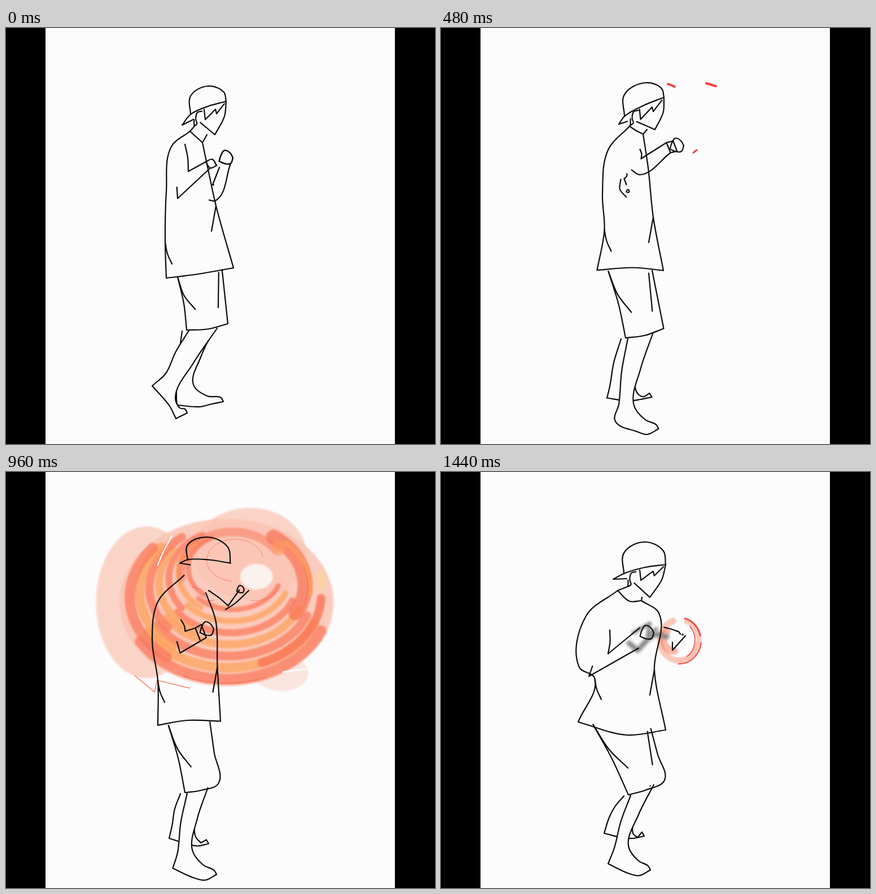
An HTML page with a canvas that plays this animation: 760 by 737 pixels, repeating every 1.52 s.

```html
<!DOCTYPE html>
<html lang="en">
<head>
<meta charset="utf-8">
<title>Fire punch</title>
<style>
html, body { margin: 0; width: 100%; height: 100%; overflow: hidden; background: #000; }
canvas { display: block; }
</style>
</head>
<body>
<canvas id="stage" width="760" height="737"></canvas>
<script>
const ctx = document.getElementById('stage').getContext('2d');
const PAPER = '#fcfcfc', INK = '#0b0b0b', PALE = '#fbc3b3', CORAL = '#f97558',
      ORANGE = '#fda057', YELLOW = '#fddb7c', RED = '#f5423b', GREY = '#888';

// hat: back, top, front, visor. head: chin, nape, throat.
// arms: shoulder, crook, elbow, both wrist sides, fist. feet: shin, heel, toe, instep.
const guard = {
  hat: [327, 153, 357, 103, 390, 130, 312, 172], head: [370, 189, 326, 183, 348, 203],
  back: [293, 210, 284, 290, 282, 380, 284, 443], front: [360, 260, 372, 315, 403, 425], hem: [340, 436],
  near: [317, 206, 323, 254, 304, 302, 354, 237, 362, 248, 390, 230],
  far: [366, 278, 366, 278, 371, 306, 378, 247, 398, 240, 390, 230],
  knees: [320, 535, 393, 524],
  foot: [283, 612, 259, 634, 321, 682, 300, 655], farFoot: [302, 658, 303, 668, 385, 662, 332, 632], inner: true
};
const punch = {
  hat: [324, 150, 365, 92, 396, 118, 317, 162], head: [378, 166, 343, 161, 365, 164],
  back: [300, 202, 291, 290, 294, 340, 281, 411], front: [372, 240, 372, 330, 394, 408], hem: [345, 402],
  near: [365, 195, 362, 163, 380, 187, 425, 142, 430, 160, 448, 156],
  far: [374, 254, 374, 254, 374, 280, 376, 255, 376, 281, 381, 269],
  knees: [319, 530, 388, 522],
  foot: [323, 662, 318, 692, 388, 706, 347, 655], farFoot: [306, 640, 304, 656, 380, 654, 346, 640]
};
const recoil = {
  hat: [326, 163, 360, 102, 394, 128, 313, 179], head: [380, 194, 325, 187, 351, 212],
  back: [292, 230, 281, 300, 285, 375, 272, 447], front: [362, 255, 380, 340, 394, 451], hem: [335, 447],
  near: [340, 235, 347, 300, 325, 333, 374, 264, 383, 282, 388, 261],
  far: [285, 262, 275, 280, 260, 292, 281, 300, 281, 318, 281, 309],
  knees: [335, 568, 401, 543],
  foot: [307, 672, 299, 700, 383, 714, 336, 680], farFoot: [292, 630, 284, 655, 367, 654, 345, 645], inner: true
};
const raise = {
  hat: [303, 171, 345, 121, 378, 165, 303, 172], head: [352, 213, 303, 203, 358, 213],
  back: [248, 240, 238, 325, 262, 370, 261, 467], front: [386, 262, 379, 340, 375, 460], hem: [320, 457],
  near: [385, 225, 420, 300, 433, 326, 434, 220, 448, 225, 429, 206],
  far: [262, 260, 277, 300, 257, 344, 311, 288, 327, 302, 342, 277],
  knees: [298, 568, 357, 556],
  foot: [301, 678, 294, 706, 371, 714, 330, 677], farFoot: [294, 630, 288, 654, 360, 662, 331, 643], inner: true
};
const swing = {
  hat: [340, 140, 372, 110, 417, 158, 313, 151], head: [370, 202, 328, 163, 350, 215],
  back: [290, 220, 280, 270, 276, 370, 277, 430], front: [357, 265, 370, 350, 385, 423], hem: [320, 423],
  near: [333, 195, 367, 174, 378, 140, 393, 198, 412, 195, 402, 210],
  far: [358, 264, 358, 264, 360, 297, 360, 265, 362, 297, 370, 280],
  knees: [336, 568, 396, 547],
  foot: [307, 670, 297, 698, 375, 712, 330, 662], farFoot: [295, 620, 290, 644, 358, 655, 340, 648], hidden: true
};
const follow = {
  hat: [342, 172, 375, 127, 414, 174, 318, 185], head: [388, 219, 345, 200, 375, 205],
  back: [295, 245, 275, 330, 271, 390, 277, 450], front: [380, 307, 375, 350, 388, 469], hem: [322, 434],
  near: [339, 222, 384, 248, 380, 305, 413, 255, 430, 278, 425, 246],
  far: [310, 215, 253, 305, 256, 340, 272, 327, 272, 340, 272, 333],
  knees: [345, 577, 411, 556],
  foot: [313, 668, 297, 696, 373, 710, 335, 665], farFoot: [298, 620, 290, 650, 358, 654, 342, 648]
};
const gather = {
  hat: [324, 180, 360, 124, 398, 164, 305, 190], head: [370, 222, 313, 210, 355, 228],
  back: [257, 255, 245, 346, 272, 365, 243, 443], front: [386, 250, 378, 350, 398, 457], hem: [330, 466],
  near: [395, 275, 421, 283, 410, 316, 424, 287, 433, 290, 428, 288],
  far: [299, 280, 296, 322, 262, 362, 352, 276, 350, 312, 365, 285],
  knees: [332, 572, 396, 546],
  foot: [307, 666, 296, 694, 371, 705, 332, 662], farFoot: [298, 612, 289, 640, 360, 645, 340, 640], inner: true
};
const poses = [guard, punch, recoil, raise, swing, follow, gather];
const starts = [0, 3, 7, 9, 13, 15, 17];

const mix = (a, b, u) => a + (b - a) * u;
const between = (p, q, u = 0.5) => [mix(p[0], q[0], u), mix(p[1], q[1], u)];
const off = (p, x, y) => [p[0] + x, p[1] + y];
const distance = (p, q) => Math.hypot(q[0] - p[0], q[1] - p[1]);
const toward = (p, q, len) => between(p, q, len / (distance(p, q) || 1));

// Smooth path through the points; sharp turns stay corners.
function path(pts) {
  const dirs = pts.slice(1).map((p, i) => {
    const d = distance(pts[i], p) || 1;
    return [(p[0] - pts[i][0]) / d, (p[1] - pts[i][1]) / d];
  });
  const tangent = (i, own) => {
    const a = dirs[i - 1], b = dirs[i];
    if (!a || !b || a[0] * b[0] + a[1] * b[1] < 0.2) return own;
    const x = a[0] + b[0], y = a[1] + b[1], d = Math.hypot(x, y);
    return [x / d, y / d];
  };
  ctx.beginPath();
  ctx.moveTo(...pts[0]);
  dirs.forEach((dir, i) => {
    const p = pts[i], q = pts[i + 1], len = distance(p, q) / 3;
    const m = tangent(i, dir), n = tangent(i + 1, dir);
    ctx.bezierCurveTo(p[0] + m[0] * len, p[1] + m[1] * len,
                      q[0] - n[0] * len, q[1] - n[1] * len, ...q);
  });
}

function stroke(pts, color = INK, width = 2.2) {
  path(pts);
  ctx.strokeStyle = color;
  ctx.lineWidth = width;
  ctx.stroke();
}
const line = (...pts) => stroke(pts);

function poseAt(step) {
  let i = starts.length - 1;
  while (starts[i] > step) i--;
  const a = poses[i], b = poses[i + 1] || a;
  const u = a === b ? 0 : (step - starts[i]) / (starts[i + 1] - starts[i]);
  const pose = { ...(u < 0.5 ? a : b) };
  for (const part in a) {
    if (!Array.isArray(a[part])) continue;
    pose[part] = [];
    for (let k = 0; k < a[part].length; k += 2)
      pose[part].push([mix(a[part][k], b[part][k], u), mix(a[part][k + 1], b[part][k + 1], u)]);
  }
  return pose;
}

function drawHead({ hat: [back, top, front, visor], head: [chin, nape, throat], hidden }) {
  line(back, [back[0], mix(back[1], top[1], 0.65)], top,
       [front[0] - 4, mix(front[1], top[1], 0.6)], front);
  line(front, off(between(front, back), 0, -3), back, visor, off(back, 5, 9));
  if (hidden) return;
  const ear = between(back, chin, 0.4);
  const hair = (u, x, y) => off(between(front, back, u), x, y);
  line(front, off(between(front, chin, 0.45), 6, 0), chin, ear);
  line(hair(0.62, 0, 0), hair(0.62, 2, 18), hair(0.3, 0, 7), hair(0.3, 2, 15), hair(0.05, 0, 3));
  line(off(ear, 3, -20), off(ear, -5, -18), off(ear, -8, -6), off(ear, -6, 3),
       off(ear, -11, 6), off(ear, -11, -5));
  const sag = Math.max(0, throat[0] - nape[0] - 22) / 2;
  line(nape, off(between(nape, throat), 0, sag), throat);
  line(off(chin, -14, 0), throat);
  line(off(ear, -9, 5), nape);
}

function drawTorso({ head, back, front, hem }) {
  line(head[1], ...back);
  line(head[2], ...front);
  line(back[3], hem[0], front[2]);
  line(back[2], off(back[2], 4, 20), off(back[2], 12, 38));
  line(front[1], off(front[1], -8, 45));
}

function drawArm([shoulder, crook, elbow, wristA, wristB, fist], band) {
  const wrist = between(wristA, wristB);
  const reach = Math.min(20, distance(elbow, wristB) / 3);
  const inner = between(crook, elbow, 0.3), ahead = toward(elbow, wristB, -reach);
  line(shoulder, off(between(shoulder, crook), 2, 0), crook);
  line(crook, wristA);
  line(off(inner, ahead[0] - elbow[0], ahead[1] - elbow[1]), elbow, wristB);
  const radius = Math.min(12, distance(wrist, fist));
  if (band) {
    const end = toward(wrist, fist, radius), x = end[0] - wrist[0], y = end[1] - wrist[1];
    line(wristA, wristB, off(wristB, x, y), off(wristA, x, y), wristA);
  }
  line(...Array.from({ length: 8 }, (_, i) => {
    const angle = i / 7 * Math.PI * 2, r = radius * (1 + 0.15 * Math.sin(angle * 3));
    return off(fist, r * Math.cos(angle), r * Math.sin(angle));
  }));
}

function drawLeg(kneeBack, kneeFront, [shin, heel, toe, instep], drop) {
  const leg = [kneeBack, off(between(kneeBack, shin), -3, 0), shin, heel,
    off(between(heel, toe), 0, drop), off(toe, -20, drop - 2), toe, off(toe, -4, -7),
    off(between(toe, instep), -2, 5), instep, off(between(instep, kneeFront), -5, 0), kneeFront];
  path(leg);
  ctx.fillStyle = PAPER;
  ctx.fill();
  stroke(leg);
}

function drawFigure(step) {
  const pose = poseAt(step), [kneeBack, kneeFront] = pose.knees;
  drawLeg(off(kneeBack, -8, 2), off(kneeFront, -25, 10), pose.farFoot, 6);
  drawLeg(off(kneeBack, 4, 1), off(kneeFront, -19, 8), pose.foot, 12);
  const hemBack = pose.back[3], hemFront = pose.front[2];
  const waistBack = off(between(hemBack, hemFront, 0.17), 0, 2);
  const waistFront = between(hemBack, hemFront, 0.83);
  line(waistBack, off(between(waistBack, kneeBack), 3, 0), kneeBack,
       off(between(kneeBack, kneeFront), 0, 4), kneeFront, between(kneeFront, waistFront), waistFront);
  line(waistBack, off(between(waistBack, kneeBack, 0.35), 6, 0),
       off(between(waistBack, kneeBack, 0.65), 21, -4));
  if (pose.inner) line(off(waistFront, -6, 5), off(between(waistFront, kneeFront, 0.7), -14, 0));
  drawTorso(pose);
  drawArm(pose.far, step > 7 && step < 12);
  drawArm(pose.near, step < 8);
  drawHead(pose);
}

// Width 0 fills the ellipse.
function arc(cx, cy, rx, ry, from, to, width, color, alpha = 0.6) {
  ctx.save();
  ctx.globalAlpha *= alpha;
  ctx.strokeStyle = ctx.fillStyle = color;
  ctx.lineWidth = width;
  ctx.beginPath();
  ctx.ellipse(cx, cy, rx, ry, 0, from, to);
  width ? ctx.stroke() : ctx.fill();
  ctx.restore();
}
const disc = (cx, cy, rx, ry, color, alpha) => arc(cx, cy, rx, ry, 0, 7, 0, color, alpha);

function placed(x, y, toX, toY, scale, alpha, draw) {
  ctx.save();
  ctx.translate(toX, toY);
  ctx.scale(scale, scale);
  ctx.translate(-x, -y);
  ctx.globalAlpha = alpha;
  draw();
  ctx.restore();
}

function blurred(radius, draw) {
  ctx.save();
  ctx.filter = `blur(${radius}px)`;
  draw();
  ctx.restore();
}

function punchFire() {
  blurred(0.8, () => {
    arc(490, 150, 36, 30, -2.2, 1.9, 24, PALE, 0.9);
    arc(492, 150, 40, 34, -1.9, 1.5, 15, CORAL);
    arc(494, 150, 38, 33, -0.9, 0.9, 13, CORAL, 0.7);
    arc(450, 172, 36, 30, -1.3, 0.5, 13, CORAL, 0.45);
  });
  arc(450, 160, 62, 38, -1.8, -0.3, 2, RED);
  arc(490, 150, 50, 42, -1, 0.6, 1.2, RED);
  stroke([[430, 121], [443, 127]], RED);
  stroke([[436, 190], [455, 186], [475, 170]], RED);
  stroke([[488, 206], [515, 195], [535, 175]], RED);
}

function punchSparks() {
  stroke([[402, 99], [414, 104]], RED, 4);
  stroke([[470, 98], [487, 103]], RED, 4);
  stroke([[447, 221], [453, 216]], RED, 3);
}

function raisedFire() {
  blurred(1.5, () => {
    arc(490, 183, 51, 88, -1.1, 1.1, 20, PALE, 0.8);
    disc(447, 175, 64, 88, PALE, 0.75);
    arc(448, 175, 58, 80, 2.8, 6.4, 24, CORAL, 0.7);
    arc(446, 175, 50, 58, 3.4, 6.2, 18, CORAL, 0.55);
    arc(438, 205, 48, 62, 2.9, 7.1, 14, ORANGE, 0.8);
    arc(450, 183, 68, 86, -0.5, 1.1, 14, ORANGE, 0.7);
    arc(452, 185, 64, 80, -0.3, 1.1, 7, YELLOW, 0.9);
    arc(436, 212, 38, 46, 2.2, 7.3, 10, CORAL, 0.7);
    disc(430, 212, 21, 30, PAPER, 0.85);
  });
  arc(430, 212, 28, 34, 3, 5.2, 2, RED, 0.9);
}

function raisedSparks() {
  stroke([[328, 244], [336, 244]], RED, 5);
  stroke([[279, 369], [284, 368]], RED, 4);
  stroke([[259, 197], [264, 197], [261, 203]], RED);
  blurred(1, () => stroke([[421, 306], [431, 292]], '#f4684f', 9));
}

// One ring of the whirl: the centre sinks as the ring widens.
const ring = (k, from, to, width, color, alpha) =>
  arc(355 - 30 * k, 120 + 150 * k, 275 * k, 215 * k, from, to, width, color, alpha);

function whirl() {
  blurred(1.5, () => {
    disc(385, 145, 145, 118, PALE, 0.7);
    ring(1, 0, 7, 0, PALE, 0.85);
    disc(120, 270, 130, 195, PALE, 0.7);
    disc(465, 452, 70, 46, PALE, 0.4);
    // Brush bands alternate between the lower sweep and the left flank.
    for (let i = 0; i < 14; i++) {
      const k = 0.42 + i * 0.041, from = i % 2 ? 0.4 : 2.3 + 0.2 * Math.sin(i * 5);
      ring(k, from, from + 1.9 + 0.3 * Math.sin(i * 3), 12 + i * 1.2,
           i % 4 > 1 ? ORANGE : CORAL, 0.7);
    }
    ring(0.7, -0.95, 0.5, 38, CORAL, 0.75);
    ring(0.76, -0.8, 0.1, 12, ORANGE, 0.7);
    ring(0.87, 0.05, 1.2, 22, CORAL, 0.8);
    ring(0.48, 3, 5.7, 22, CORAL, 0.5);
    disc(460, 130, 18, 20, ORANGE, 0.5);
    disc(568, 212, 12, 28, YELLOW, 0.4);
    disc(402, 204, 42, 33, PAPER, 0.8);
  });
  arc(347, 162, 73, 54, 1.7, 6.1, 1.3, RED);
  arc(400, 220, 60, 46, 0.3, 1.8, 1.3, RED);
  ring(0.73, -0.35, 0.3, 1.3, RED);
  ring(0.98, 1.2, 2, 1.3, RED);
  stroke([[238, 229], [265, 242], [275, 265], [293, 264]], RED, 1.2);
  stroke([[90, 458], [140, 500], [147, 470], [230, 490]], CORAL, 2);
  stroke([[148, 175], [163, 140], [185, 100]], PAPER, 3);
  stroke([[470, 449], [528, 441]], PAPER, 4);
}

function embers() {
  const tint = '#fb9c8d';
  stroke([[660, 95], [671, 106], [675, 115], [671, 127]], tint, 7);
  stroke([[70, 580], [76, 588]], tint, 4);
  stroke([[432, 674], [447, 679], [459, 663]], tint, 5);
  stroke([[399, 684], [411, 678]], tint, 2.5);
}

function orb() {
  blurred(0.8, () => {
    arc(422, 298, 34, 36, 0.2, 4.4, 11, PALE, 0.9);
    arc(422, 298, 35, 36, -1.2, 1.6, 9, PALE, 0.9);
    arc(412, 297, 18, 20, 1.5, 4, 13, CORAL, 0.5);
  });
  arc(422, 298, 38, 40, -1.3, -0.2, 3, RED, 0.9);
  arc(420, 298, 30, 34, -0.8, 1, 2, RED, 0.8);
  arc(422, 298, 39, 42, 0.1, 1.6, 2, RED, 0.9);
}

function smudges(step) {
  blurred(2.5, () => {
    if (step === 15) {
      stroke([[350, 276], [377, 305]], GREY, 5);
      stroke([[393, 305], [417, 270], [418, 290], [430, 278]], GREY, 4);
    }
    if (step === 17) {
      stroke([[340, 285], [370, 268], [366, 290], [382, 278]], GREY, 6);
      stroke([[333, 303], [348, 316], [380, 288], [400, 292]], GREY, 9);
    }
  });
}

function drawFire(step) {
  if (step === 2) placed(490, 150, 452, 170, 0.55, 0.7, punchFire);
  if (step === 3) punchFire();
  if (step === 4) placed(490, 150, 486, 152, 0.9, 0.45, punchFire);
  if (step > 2 && step < 6) punchSparks();
  if (step === 8) placed(430, 212, 415, 235, 0.5, 0.7, raisedFire);
  if (step === 9) { raisedFire(); raisedSparks(); }
  if (step > 9 && step < 14) {
    const u = (step - 9) / 4;
    placed(335, 265, mix(460, 335, u), mix(190, 265, u), mix(0.38, 1, u), 1, whirl);
  }
  if (step === 14) placed(335, 265, 355, 285, 1.13, 0.45, whirl);
  if (step === 15) embers();
  if (step === 16) placed(422, 298, 428, 270, 0.5, 0.7, orb);
  if (step === 17) orb();
}

function render() {
  const time = performance.now() % 1520;
  const step = Math.max(0, Math.floor(time / 80) - 1);
  ctx.fillStyle = '#000';
  ctx.fillRect(0, 0, 760, 737);
  ctx.save();
  ctx.beginPath();
  ctx.rect(70, 0, 619, 737);
  ctx.clip();
  ctx.fillStyle = PAPER;
  ctx.fillRect(70, 0, 619, 737);
  ctx.lineCap = ctx.lineJoin = 'round';
  drawFire(step);
  smudges(step);
  drawFigure(step);
  ctx.restore();
  requestAnimationFrame(render);
}
render();
</script>
</body>
</html>
```
